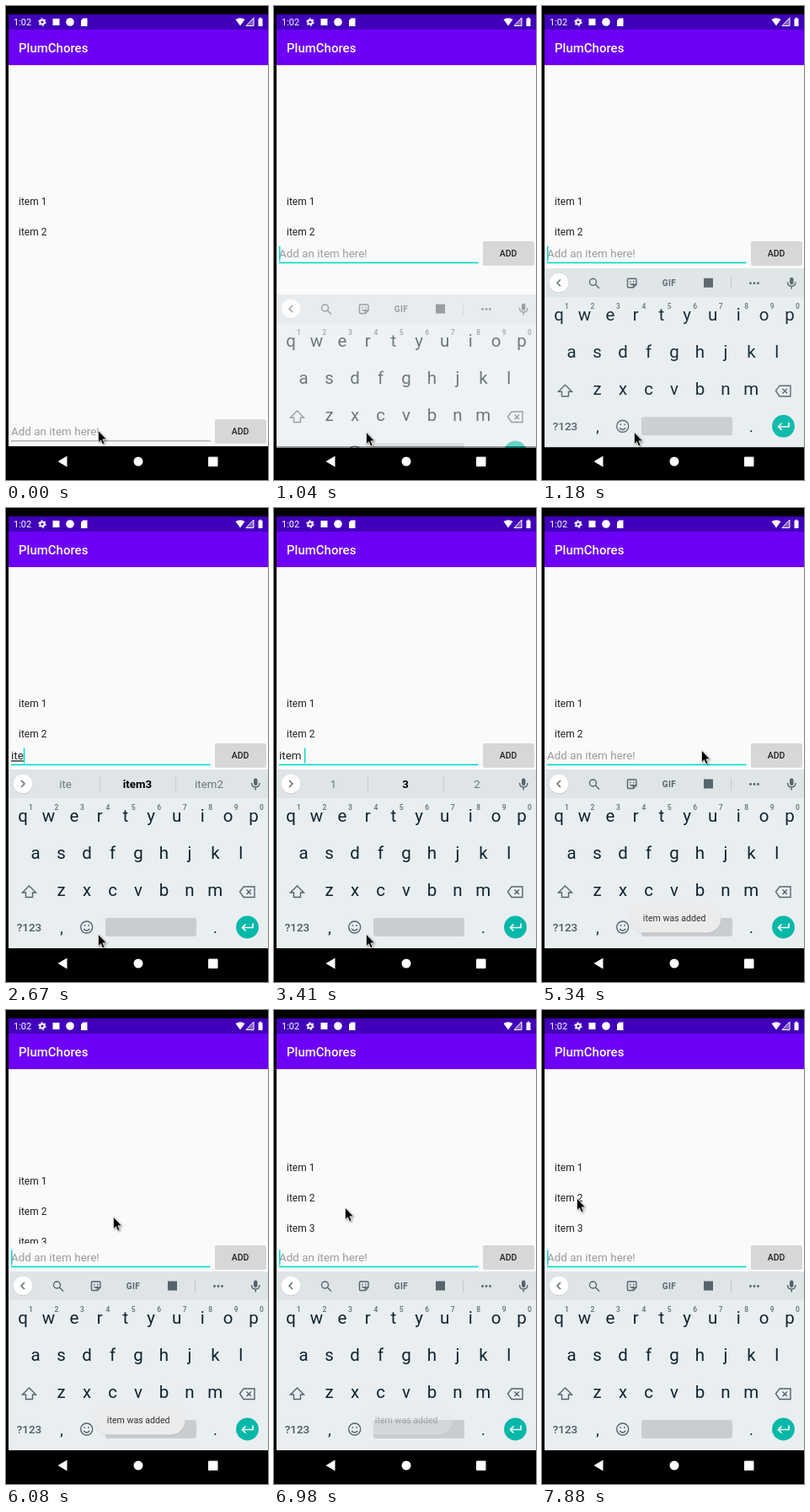
These frames come from a looping animation (311 by 562 pixels, 8000 ms). An HTML page:

```html
<!DOCTYPE html>
<html lang="en">
<head>
<meta charset="utf-8">
<style>
  html, body { margin: 0; height: 100%; overflow: hidden; background: #000; }
  svg { display: block; width: 100vw; height: 100vh; font-family: Roboto, sans-serif; }
  text { white-space: pre; }
  .mid { text-anchor: middle; }
  .med { font-weight: 500; }
  .line { fill: none; stroke: #56646b; stroke-width: 1.4; }
  .hide { display: none; }
  #mouse { filter: drop-shadow(1px 1.5px 1px #0006); }
</style>
</head>
<body>
<svg viewBox="0 0 311 562">
  <defs>
    <clipPath id="listClip"><rect x="3" y="70" width="308" height="207"/></clipPath>
    <clipPath id="keysClip"><rect x="3" y="308" width="308" height="216"/></clipPath>
  </defs>
  <rect width="311" height="562"/>
  <rect x="3" y="28" width="308" height="494" fill="#fafafa"/>
  <rect x="3" y="10" width="308" height="18" fill="#4100ba"/>
  <rect x="3" y="28" width="308" height="42" fill="#6d00f7"/>
  <rect x="3" y="70" width="308" height="1" opacity=".08"/>

  <g fill="#fff">
    <text x="9" y="23" font-size="11">1:02</text>
    <circle cx="43" cy="19" r="2.6" fill="none" stroke="#fff" stroke-width="2"/>
    <circle cx="43" cy="19" r="4.1" fill="none" stroke="#fff" stroke-width="1.2" stroke-dasharray="2.15"/>
    <rect x="55.500" y="15" width="8" height="8"/>
    <circle cx="76" cy="19" r="4.800"/>
    <path d="M91.500 14.500H96.500V24H89V17Z"/>
    <path d="M272.500 16Q278 12.500 283.500 16L278 23.500Z"/>
    <path d="M294 14V23.500H285Z" fill="#fff" fill-opacity=".35" stroke="#fff"/>
    <path d="M299.500 15H300.700V13.700H303.300V15H304.500V24H299.500Z"/>
    <text class="med" x="15" y="55" font-size="15">PlumChores</text>
    <path d="M61.500 540L72.500 533.500V546.500Z"/>
    <circle cx="157" cy="540" r="5.500"/>
    <rect x="240" y="534.500" width="11.500" height="11.500" rx="1"/>
  </g>

  <g clip-path="url(#listClip)"><g id="list" font-size="12" fill="#222">
    <text x="15" y="236.400">item 1</text>
    <text x="15" y="272.400">item 2</text>
    <text id="third" x="15" y="308.400">item 3</text>
  </g></g>

  <g id="form">
    <rect x="248" y="280" width="61" height="28" rx="2" opacity=".12"/>
    <rect id="button" x="248" y="279" width="60.500" height="28" rx="1.500"/>
    <text class="mid med" x="278" y="296.800" font-size="10.500" fill="#222">ADD</text>
    <rect id="rule" x="6" width="236.500"/>
    <text id="hint" x="6" y="298.300" font-size="13.450" fill="#9b9b9b">Add an item here!</text>
    <text id="entry" x="6" y="298.300" font-size="13.450" fill="#222"></text>
    <rect id="caret" y="284.500" width="1.500" height="18" fill="#03dac5"/>
  </g>

  <g clip-path="url(#keysClip)"><g id="keyboard">
    <rect x="3" y="310" width="308" height="212" fill="#e9eef1"/>
    <rect x="3" y="310" width="308" height="34" fill="#dfe4e7"/>
    <circle cx="20" cy="327.500" r="11.500" opacity=".12"/>
    <circle cx="20" cy="327" r="11.300" fill="#fff"/>
    <path id="chevron" class="line" d="M2 -4L-2 0L2 4"/>
    <g id="tools">
      <g class="line">
        <circle cx="60.500" cy="326" r="4"/><path d="M63.500 329L68 333.500"/>
        <path d="M102.500 322H111Q112 322 112 323V329L108.500 332.500H102.500Q101.500 332.500 101.500 331.500V323Q101.500 322 102.500 322ZM112 329H108.500V332.500M104.500 328Q106.500 330 109 328M104 325.500H105.500M108 325.500H109.500"/>
      </g>
      <text class="mid" x="151" y="331" font-size="10" font-weight="700" fill="#56646b" letter-spacing=".5">GIF</text>
      <rect x="192" y="321.500" width="11" height="11" fill="#56646b"/>
      <path d="M224.500 320V335" stroke="#c3c9cd"/>
      <g fill="#56646b"><circle cx="247.500" cy="327.500" r="1.400"/><circle cx="252" cy="327.500" r="1.400"/><circle cx="256.500" cy="327.500" r="1.400"/></g>
    </g>
    <g id="words" class="mid" font-size="13.300" fill="#6a757b">
      <text x="70.500" y="332"></text>
      <text x="156" y="332" font-weight="700" fill="#000"></text>
      <text x="241" y="332"></text>
      <path d="M111.500 318V336M201.500 318V336" stroke="#c3c9cd"/>
    </g>
    <rect x="294" y="320.500" width="4.500" height="8.500" rx="2.200" fill="#56646b"/>
    <path class="line" d="M291.500 326Q291.500 331 296.200 331T301 326M296.200 331V334.500"/>

    <g id="letters" class="mid" font-size="20.500" fill="#10242e"></g>
    <g class="line">
      <path d="M27.500 448L35.500 456H31.500V461.500H23.500V456H19.500Z"/>
      <path d="M277.500 455L282 449H295V461.500H282ZM285.500 452.500L291 458M291 452.500L285.500 458"/>
      <circle cx="95.700" cy="497" r="7"/>
      <path d="M92.200 499Q95.700 503 99.200 499M92.500 495H94.200M97.200 495H98.900"/>
    </g>
    <text class="mid med" x="27.500" y="501.500" font-size="13.500" fill="#4c5a61">?123</text>
    <g class="mid" font-size="18" fill="#10242e"><text x="66" y="503.500">,</text><text x="248.300" y="503.500">.</text></g>
    <rect x="118" y="486" width="108" height="22" rx="3" fill="#c9cdd1"/>
    <circle cx="286.500" cy="497" r="13.400" fill="#06b8a8"/>
    <path d="M293 492.500V497.500H280.500M284.500 493.500L280.500 497.500L284.500 501.500" fill="none" stroke="#fff" stroke-width="1.600"/>
  </g></g>

  <g id="toast">
    <rect x="104" y="470" width="109" height="35" rx="17.500" opacity=".05"/>
    <rect x="104.500" y="469" width="108" height="34.500" rx="17.200" fill="#ebebeb"/>
    <text class="mid" x="157.200" y="490" font-size="10.600" fill="#333">item was added</text>
  </g>
  <path id="mouse" d="M.5 .3V14.500L3.600 11.700L5.700 16.700L8 15.700L5.900 10.800H10.300Z" stroke="#fff" stroke-width=".7"/>
</svg>
<script>
const LOOP = 8000, BEAT = 148.2, BLINK = 3.4;   // the screen refreshes once per beat
const ui = {};
for (const el of document.querySelectorAll('[id]')) ui[el.id] = el;

// Each row of keys is centred on the screen.
function addRow(keys, y) {
  [...keys].forEach((key, i) => {
    const x = 157 + (i - (keys.length - 1) / 2) * 30.45;
    ui.letters.innerHTML += `<text x="${x}" y="${y}">${key}</text>`;
    if (keys.length === 10)
      ui.letters.innerHTML += `<text class="med" x="${x + 9.5}" y="358" font-size="8.5" fill="#5f6d74">${(i + 1) % 10}</text>`;
  });
}
addRow('qwertyuiop', 372);
addRow('asdfghjkl', 416);
addRow('zxcvbnm', 460);

// [beat, text, suggestions]
const typing = [
  [0, ''],
  [13, 'i'],
  [14, 'i', ['in', 'item', 'is']],
  [15, 'it', ['it', 'item3', 'item2']],
  [18, 'ite', ['ite', 'item3', 'item2']],
  [19, 'item', ['item', 'item3', 'item2']],
  [22, 'item ', ['item', 'item3', 'item2']],
  [23, 'item ', ['1', '3', '2']],
  [25, 'item 3'],
  [32.4, '']
];
// [beat, x, y]
const mousePath = [
  [0, 109, 503], [1, 109, 505], [27, 109, 505], [30, 278, 293], [33, 278, 293],
  [35, 290, 289], [36, 189, 287], [37, 127, 245], [45, 127, 245], [49, 41, 223]
];
const scrollPath = [[38, 0], [39, 4], [41, 29], [42, 45]];
const toastPath = [[32, 0], [34, 1], [45, 1], [48, 0]];
const slidePath = [[6, 110], [7, 32], [8, 1.2], [9, 0]];

function along(path, n) {
  const i = path.findIndex(p => p[0] > n);
  if (i < 0) return path[path.length - 1].slice(1);
  if (i === 0) return path[0].slice(1);
  const a = path[i - 1], b = path[i], f = (n - a[0]) / (b[0] - a[0]);
  return a.slice(1).map((v, k) => v + (b[k + 1] - v) * f);
}
const show = (el, on) => el.classList.toggle('hide', !on);
const set = (el, attrs) => { for (const k in attrs) el.setAttribute(k, attrs[k]); };
const move = (el, x, y) => set(el, { transform: `translate(${x} ${y})` });

function draw(n) {
  const focused = n >= 6, open = n >= 7;
  const [start, text, words] = typing.filter(s => s[0] <= n).pop();

  move(ui.mouse, ...along(mousePath, n));
  move(ui.list, 0, -along(scrollPath, n)[0]);
  show(ui.third, n >= 32);
  set(ui.toast, { opacity: along(toastPath, n)[0] });

  move(ui.form, 0, open ? 0 : 211);
  set(ui.button, { fill: n === 31 || n === 32 ? '#c6c7c7' : '#d6d7d7' });
  set(ui.rule, focused ? { y: 303.6, height: 1.6, fill: '#03dac5' } : { y: 304.3, height: 1, fill: '#8c8c8c' });
  show(ui.hint, !text);
  ui.entry.textContent = text;
  set(ui.entry, { 'text-decoration': words && !text.endsWith(' ') ? 'underline' : 'none' });
  const edited = start || 6;
  show(ui.caret, focused && Math.floor((n - edited) / BLINK) % 2 === 0);
  set(ui.caret, { x: 6 + (text ? ui.entry.getComputedTextLength() : 0) });

  show(ui.keyboard, open);
  move(ui.keyboard, 0, along(slidePath, n)[0]);
  set(ui.keyboard, { opacity: n === 7 ? 0.6 : n === 8 ? 0.95 : 1 });
  set(ui.chevron, { transform: `translate(20 327) scale(${words ? -1 : 1} 1)` });
  show(ui.tools, !words);
  show(ui.words, words);
  if (words) words.forEach((w, i) => { ui.words.children[i].textContent = w; });
}

function tick() {
  draw(Math.floor((performance.now() % LOOP + 9) / BEAT));
  requestAnimationFrame(tick);
}
tick();
</script>
</body>
</html>
```
